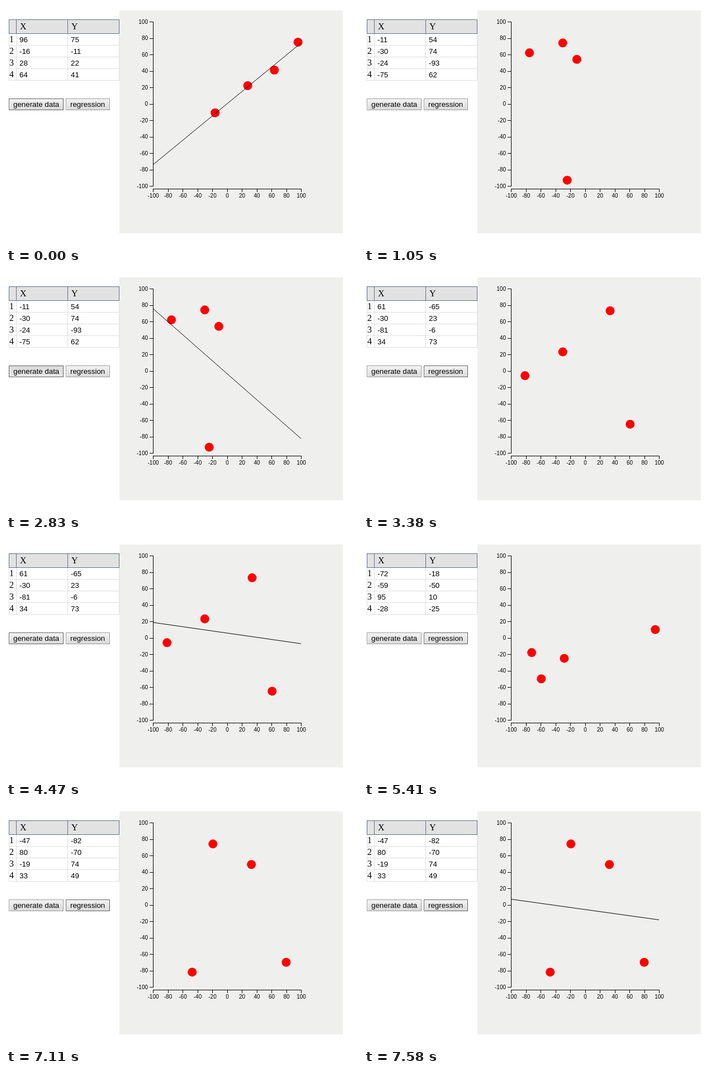
An HTML page for the animation above (8 s loop, 630 by 429 pixels).

```html
<!DOCTYPE html>
<html lang="en">
<head>
<meta charset="utf-8">
<title>Linear regression</title>
<style>
html, body { margin: 0; width: 100%; height: 100%; overflow: hidden; background: #fff; }
svg { display: block; }
text { font: 13.333px "Liberation Sans", Arial, sans-serif; }
.serif { font: 16px "Liberation Serif", Times, serif; }
.tick { font-size: 10px; }
</style>
</head>
<body>
<svg id="stage" width="630" height="429">
  <defs>
    <linearGradient id="up" x2="0" y2="1"><stop stop-color="#f3f3f3"/><stop offset="1" stop-color="#dadada"/></linearGradient>
    <linearGradient id="down" x2="0" y2="1"><stop stop-color="#d9d9d9"/><stop offset="1" stop-color="#e8e8e8"/></linearGradient>
  </defs>
</svg>
<script>
const stage = document.getElementById('stage');

function add(tag, attrs, text = '') {
  const el = document.createElementNS('http://www.w3.org/2000/svg', tag);
  for (const key in attrs) el.setAttribute(key, attrs[key]);
  el.textContent = text;
  return stage.appendChild(el);
}
const label = (x, y, text, attrs) => add('text', { x, y, ...attrs }, text);
const rect = (x, y, width, height, fill) => add('rect', { x, y, width, height, fill });

// Table
const ROWS = [0, 1, 2, 3], COLUMNS = [5, 18, 110, 202];
for (const x of COLUMNS) rect(x, 50, 1, 84, '#dedede');
for (const i of ROWS) {
  rect(5, 70 + 21 * i, 198, 1, '#dedede');
  label(6, 65 + 21 * i, i + 1, { class: 'serif' });
}
rect(5, 24, 198, 26, '#e2e2e2');
for (const x of COLUMNS) rect(x, 24, 1, 26, '#5f6f85');
for (const y of [24, 49]) rect(5, y, 198, 1, '#5f6f85');
label(25, 42, 'X', { class: 'serif' });
label(117, 42, 'Y', { class: 'serif' });
const cells = ROWS.map(i => [24, 116].map(x => label(x, 65 + 21 * i, '')));

// Buttons
function button(x, width, text) {
  const box = add('rect', { x: x + .5, y: 166.5, width: width - 1, height: 20 });
  const shine = add('path', { d: `M${x + 1} 167.5h${width - 2}M${x + 1.5} 168v18`, stroke: '#fafafa' });
  label(x + 8, 181, text);
  return mode => {
    box.setAttribute('fill', mode === PRESS ? 'url(#down)' : 'url(#up)');
    box.setAttribute('stroke', mode === IDLE ? '#999' : '#606060');
    shine.setAttribute('opacity', mode === PRESS ? 0 : 1);
  };
}
const IDLE = 0, HOVER = 1, PRESS = 2;
const setGenerate = button(5, 98, 'generate data');
const setRegress = button(107, 79, 'regression');

// Chart
const px = v => 263 + (v + 100) * 1.325;
const py = v => 28 + (100 - v) * 1.475;
rect(203, 8, 400, 400, '#efefed');
rect(263, 28, 1, 296, '#000');
rect(263, 328, 266, 1, '#000');
for (let v = -100; v <= 100; v += 20) {
  rect(257, Math.round(py(v)), 6, 1, '#000');
  rect(Math.round(px(v)), 328, 1, 6, '#000');
  label(254, py(v) + 3.7, v, { class: 'tick', 'text-anchor': 'end' });
  label(px(v) + .5, 344.1, v, { class: 'tick', 'text-anchor': 'middle' });
}
const dots = ROWS.map(() => add('circle', { r: 8, fill: 'red' }));
const fit = add('line', { x1: px(-100), x2: px(100), stroke: '#000' });

const DATA = [
  [[96, 75], [-16, -11], [28, 22], [64, 41]],
  [[-11, 54], [-30, 74], [-24, -93], [-75, 62]],
  [[61, -65], [-30, 23], [-81, -6], [34, 73]],
  [[-72, -18], [-59, -50], [95, 10], [-28, -25]],
  [[-47, -82], [80, -70], [-19, 74], [33, 49]]
];

// Least squares; returns the value of the fitted line at x
function regression(points) {
  const mean = k => points.reduce((sum, p) => sum + p[k], 0) / points.length;
  const mx = mean(0), my = mean(1);
  let sxy = 0, sxx = 0;
  for (const [x, y] of points) {
    sxy += (x - mx) * (y - my);
    sxx += (x - mx) ** 2;
  }
  return x => my + sxy / sxx * (x - mx);
}

const onGenerate = { gen: HOVER, reg: IDLE }, onRegress = { gen: IDLE, reg: HOVER };
const EVENTS = [
  [0, { set: 0, line: true, ...onGenerate }],
  [500, { set: 1, line: false }],
  [1050, { gen: IDLE }],
  [1120, { reg: HOVER }],
  [1900, { line: true }],
  [2370, { reg: IDLE }],
  [2450, { gen: HOVER }],
  [2830, { gen: PRESS }],
  [2910, { set: 2, line: false, gen: HOVER }],
  [3380, onRegress],
  [3850, { reg: PRESS }],
  [3920, { line: true, reg: HOVER }],
  [4470, onGenerate],
  [4940, { gen: PRESS }],
  [5000, { set: 3, line: false }],
  [5260, { gen: HOVER }],
  [5410, onRegress],
  [5790, { line: true }],
  [6260, onGenerate],
  [6640, { gen: PRESS }],
  [6720, { set: 4, line: false, gen: HOVER }],
  [7110, onRegress],
  [7510, { reg: PRESS }],
  [7580, { line: true, reg: HOVER }]
];

function draw(now) {
  const t = now % 8000, state = {};
  for (const [at, change] of EVENTS) if (at <= t) Object.assign(state, change);
  const points = DATA[state.set], value = regression(points);
  points.forEach(([x, y], i) => {
    cells[i][0].textContent = x;
    cells[i][1].textContent = y;
    dots[i].setAttribute('cx', px(x));
    dots[i].setAttribute('cy', py(y));
  });
  fit.setAttribute('y1', py(value(-100)));
  fit.setAttribute('y2', py(value(100)));
  fit.setAttribute('visibility', state.line ? 'visible' : 'hidden');
  setGenerate(state.gen);
  setRegress(state.reg);
}

const start = performance.now();
function loop() {
  draw(performance.now() - start);
  requestAnimationFrame(loop);
}
loop();
</script>
</body>
</html>
```
